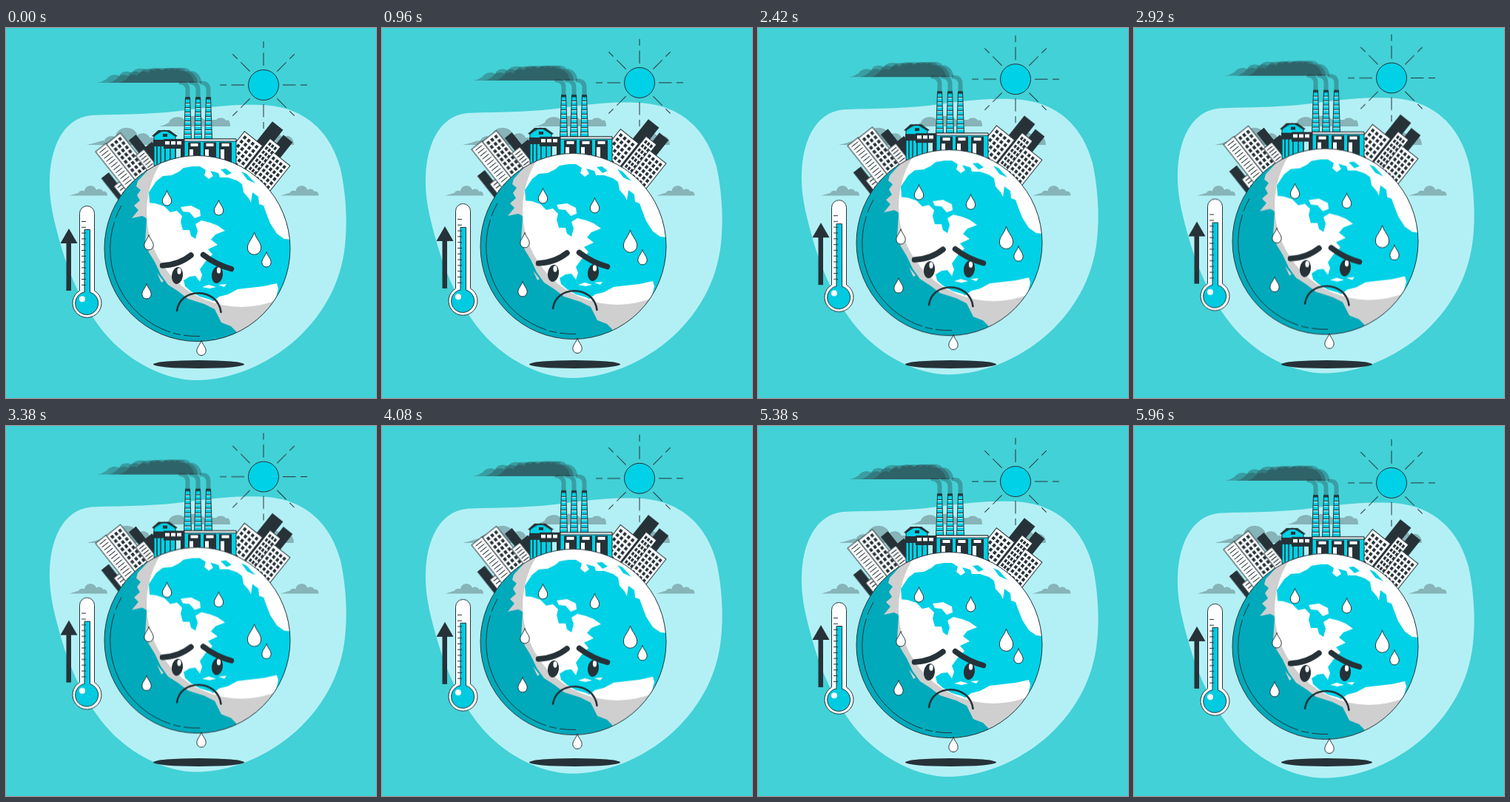
An HTML page that plays this animation: 500 px wide and 500 px high, repeating every 6000 ms.

```html
<!DOCTYPE html>
<html lang="en">
<head>
<meta charset="utf-8">
<title>Warming planet</title>
<style>
html, body { margin: 0; width: 100%; height: 100%; overflow: hidden; background: #42d1d6; }
svg { display: block; width: 100%; height: 100%; }
.ink { fill: #263238; }
.line { fill: none; stroke: #263238; }
.sea { fill: #00d1e6; stroke: #263238; }
.paper { fill: #fff; stroke: #263238; }
.cloud { fill: #263238; opacity: .32; }
.smoke { fill: #263238; opacity: .32; }
.round { stroke-linecap: round; }
</style>
</head>
<body>
<svg viewBox="0 0 500 500">
  <defs>
    <clipPath id="disc"><circle cx="258.500" cy="298" r="125.500"/></clipPath>
    <path id="puff" d="M0 0C7-1.500 10-3.500 13-3.500C14-6.500 18-7.500 21-6C22-15.500 35-15.500 37-7.500C41-10.500 45-8.500 46-5.500C50-6.500 52-3.500 52 0Z"/>
    <path id="drop" d="M0 0C1.500 6 6.200 9 6.200 14.300A6.200 6.200 0 0 1-6.200 14.300C-6.200 9-1.500 6 0 0Z"/>
    <path id="plume" d="M123 74C131 73 133 70 136 69C139 63 149 62 153 65C155 58 166 57 170 61C172 54 187 53 191 58C194 53 208 53 212 57C216 53 232 52 236 58C247 58 253 65 254 74Z"/>
  </defs>

  <g class="float">
    <path fill="#b3f0f5" d="M59 205C60 165 75 122 115 118C165 116 205 117 250 110C300 104 318 103 345 104C408 106 440 145 452 190C459 222 461 255 459 283C456 338 432 384 393 420C352 457 300 476 258 476C215 476 170 452 140 420C108 385 88 340 76 300C65 262 58 235 59 205Z"/>
  </g>

  <g class="cloud">
    <use href="#puff" x="85" y="226.500"/>
    <use href="#puff" x="370.500" y="226.500"/>
    <use href="#puff" transform="translate(109 158) scale(1.850 1.750)"/>
    <path d="M206 133C214 132 217 129 220 128C222 119 238 118 241 124C248 117 262 117 268 124L284 124C287 120 296 121 297 125C302 123 303 128 303 133Z"/>
    <path d="M330 158C336 150 344 152 348 148C356 138 370 140 373 148C380 143 389 147 389 158Z"/>
  </g>
  <ellipse class="ink" cx="260.500" cy="454.500" rx="61.500" ry="5.500"/>

  <g class="float">
    <g id="sun"><circle class="sea" cx="348" cy="77" r="20.500"/></g>
    <g id="smoke"></g>
    <g id="left" transform="translate(160 200) rotate(-38.500)"></g>
    <g id="right" transform="translate(350 195) rotate(38.500)"></g>
    <g id="stacks"></g>

    <g id="plant">
      <path class="sea" d="M200 186V145L214 138L229 145V186Z"/>
      <path class="ink" d="M197 146L206 138H221L232 146L229 147L218 140H209L200 147ZM212 143h6v4h-6z"/>
      <path class="ink" d="M199 151h16v9h-16zM213 150h28v13h-28zM236 160h5v25h-5z"/>
      <path fill="#fff" d="M215 153h6v4.500h-6zM223 153h6v4.500h-6zM231 153h6v4.500h-6z"/>
      <path class="line" d="M204 160V184M209 160V184M215 160V184M222 163V184M229 163V184" stroke-width="1.500"/>
      <path class="sea" d="M241 150H311V185H241Z"/>
      <path class="paper" d="M241 150h70v3h-70z"/>
    </g>

    <g clip-path="url(#disc)">
      <circle fill="#00d1e6" cx="258.500" cy="298" r="126"/>
      <g fill="#fff">
        <path d="M201 178L190 194L178 207L176 214L182 219L177 226L181 233L173 240L179 246L170 257L184 254L192 258L194 235L193 222L203 207L212 200L224 199L234 194L240 189L252 187L262 187L270 192L268 199L274 204L280 200L276 193L287 196L289 202L300 202L312 206L319 211L321 222L328 230L331 236L333 222L341 228L342 238L348 240L352 251L357 264L366 278L376 285L388 286V165H200Z"/>
        <path d="M187 250L190 259L189 275L188 290L193 303L201 316L209 333L219 347L233 356L246 366L268 373L284 381L290 375L276 367L262 363L250 356L242 349L240 341L248 336L256 335L262 343L265 334L262 326L270 315L279 306L273 299L286 293L277 286L283 279L296 274L286 267L276 263L264 260L256 265L259 274L256 285L250 281L248 273L239 273L236 262L238 254L231 247L222 249L214 241L202 237L190 236Z"/>
        <path d="M236 242L250 240L262 246L263 254L255 257L248 249L239 248ZM265 350L274 347L284 350L275 352ZM287 347L298 346L295 350Z"/>
        <path d="M204 331L213 342L210 344Z"/>
        <path d="M278 371L288 363L300 360L313 353L330 351L348 349L366 345L368 352L365 364L362 390V420H312L311 410L304 403L291 398L286 388L283 382Z"/>
      </g>
      <path fill="#00d1e6" d="M290 191L297 190L305 196L298 199ZM318 194L325 197L337 210L326 205Z"/>
      <path fill-rule="evenodd" opacity=".19" d="M120 160H400V430H120ZM190 249a128 128 0 0 0 256 0a128 128 0 0 0-256 0Z"/>
    </g>
    <circle class="line" cx="258.500" cy="298" r="125.500"/>
    <path class="line" d="M156 240A118.500 118.500 0 0 0 148 257M146.500 262A118.500 118.500 0 0 0 222 411M226 412.300A118.500 118.500 0 0 0 236 414.500M240 415.200A118.500 118.500 0 0 0 262 416.500"/>

    <g id="drops"></g>

    <g class="ink">
      <ellipse cx="231.500" cy="334.500" rx="7.500" ry="11.500" transform="rotate(8 231.500 334.500)"/>
      <ellipse cx="285.500" cy="333.500" rx="7.500" ry="11.500" transform="rotate(8 285.500 333.500)"/>
    </g>
    <ellipse cx="234" cy="328.500" rx="2.600" ry="4.200" fill="#fff"/>
    <ellipse cx="287.500" cy="327.500" rx="2.600" ry="4.200" fill="#fff"/>
    <path class="line round" stroke-width="7.500" d="M211.500 321Q234 320 250 307M266.500 306.500Q284 320 304.500 325.500"/>
    <path class="line round" stroke-width="2.600" d="M231 382C235 350 286 350 290.500 384"/>

    <path class="paper" d="M99.500 355V250.500a10 10 0 0 1 20 0V355A19.500 19.500 0 1 1 99.500 355Z"/>
    <path fill="#00cbe0" stroke="#263238" d="M106 356.800V272.500H113.500V357.100A15.500 15.500 0 1 1 106 356.800Z"/>
    <circle cx="103" cy="366.300" r="4" fill="#fff"/>
    <path id="ticks" class="line"/>
    <path class="ink" d="M85 271L96.500 291H88V355H81.500V291H73.500Z"/>
  </g>
</svg>
<script>
const NS = 'http://www.w3.org/2000/svg';
const $ = id => document.getElementById(id);

function add(parent, tag, attrs) {
  const node = document.createElementNS(NS, tag);
  for (const key in attrs) node.setAttribute(key, attrs[key]);
  return $(parent).appendChild(node);
}

function box(parent, cls, x, y, width, height) {
  add(parent, 'rect', { class: cls, x, y, width, height });
}

// White block with a grid of dark windows
function tower(parent, x, y, w, h, cols, ww, wh, pitch) {
  box(parent, 'paper', x, y, w, h);
  const step = (w - 4) / cols;
  let d = '';
  for (let r = y + 4; r < y + h - wh; r += pitch)
    for (let c = 0; c < cols; c++)
      d += `M${x + 2 + c * step + (step - ww) / 2} ${r}h${ww}v${wh}h${-ww}z`;
  add(parent, 'path', { class: 'ink', d });
}

for (let a = 0; a < 360; a += 45)
  add('sun', 'path', { class: 'line', d: 'M26 0H43.5M50 0H59', transform: `translate(348 77) rotate(${a})` });

for (let i = 0; i < 3; i++) {
  const x = 245.5 + 14 * i;
  add('smoke', 'use', { href: '#plume', class: 'smoke', transform: `translate(${23 * i}) scale(${1 - .07 * i} 1)` });
  add('smoke', 'path', { class: 'smoke', d: `M${x - 3} 95V84Q${x - 3} 76 ${x - 12} 76V72Q${x + 3} 70 ${x + 3} 84V95Z` });

  add('stacks', 'path', { class: 'sea', d: `M${x - 3} 94H${x + 3}L${x + 5} 151H${x - 5}Z` });
  box('stacks', 'ink', x - 3.5, 93.5, 7, 3);
  for (let y = 101; y < 150; y += 6) {
    const half = 3 + (y - 94) / 28;
    box('stacks', 'ink', x - half, y, 2 * half, 1.3);
    add('stacks', 'path', { stroke: '#fff', d: `M${x - half + .5} ${y + 1.8}H${x + half - .5}` });
  }

  const bay = 246 + 21 * i;
  box('plant', 'ink', bay, 154.5, 17, 30);
  box('plant', 'paper', bay + 3, 155.5, 11, 5);
  add('plant', 'path', { fill: '#fff', d: `M${bay + 2} 164h5v20h-5z` });
}

box('left', 'ink', 34.5, -34, 12.5, 60);
box('left', 'ink', 47, -13, 11, 40);
box('left', 'ink', -26.5, -17, 13, 46);
tower('left', -20, 2, 14, 30, 1, 8, 1.2, 5);
tower('left', -10, -50, 18, 80, 1, 11, .9, 5);
tower('left', 8, -49, 24, 78, 3, 4, 4.6, 7.2);
tower('left', 29, -12, 14, 40, 1, 9, 1.2, 4.5);

box('right', 'ink', -35, -60, 18.5, 80);
box('right', 'ink', -12, -55, 16, 70);
tower('right', -56, -26, 31, 56, 4, 4, 4.4, 7.2);
tower('right', -23, -40, 18, 70, 3, 3.2, 4.4, 7);
tower('right', -8, -28, 29, 58, 4, 3.8, 4.4, 7);

for (const [x, y, s] of [[217.5, 219.5, 1], [287.5, 232.5, 1], [193, 279.5, 1], [190, 345.5, 1],
  [335.5, 276, 1.48], [352, 302.5, 1], [264, 422, 1]])
  add('drops', 'use', { href: '#drop', class: 'paper', 'stroke-width': 1 / s, transform: `translate(${x} ${y}) scale(${s})` });

let marks = '';
for (let y = 261.5; y < 350; y += 7.8) marks += `M102 ${y}h6`;
$('ticks').setAttribute('d', marks);

const floats = document.querySelectorAll('.float');
const start = performance.now();

function draw(now) {
  const p = Math.max(0, now - start) % 6000 / 6000;
  const lift = 9.7 * (1 - Math.abs(1 - 2 * p));
  for (const g of floats) g.setAttribute('transform', `translate(0 ${-lift})`);
  requestAnimationFrame(draw);
}
draw(start);
</script>
</body>
</html>
```
